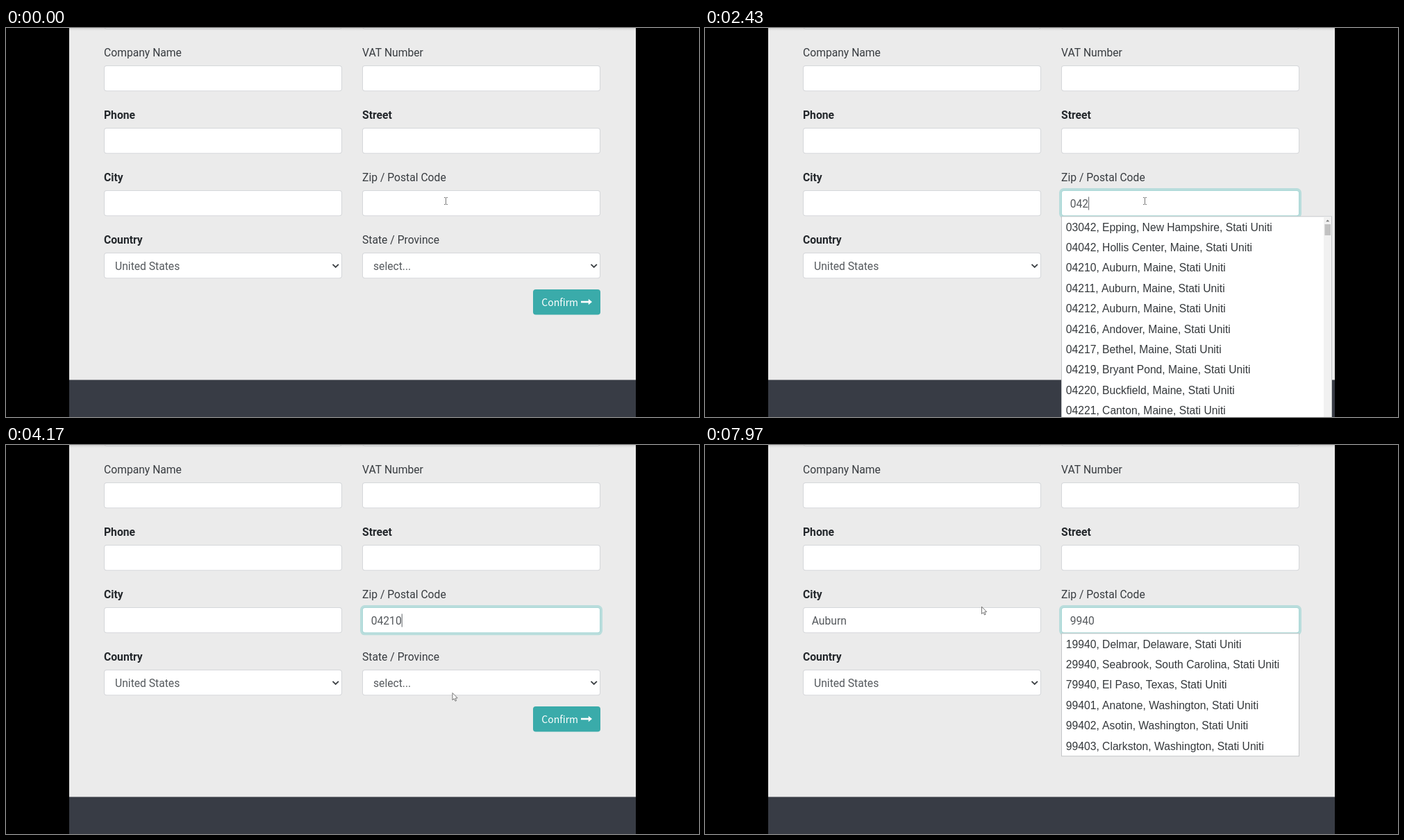
An HTML page with a canvas for the animation above (8 s loop, 998x561 px).

```html
<!DOCTYPE html>
<html lang="en">
<head>
<meta charset="utf-8">
<title>Address form</title>
<style>
html, body { margin: 0; width: 100%; height: 100%; overflow: hidden; background: #000; }
canvas { display: block; width: 998px; height: 561px; }
</style>
</head>
<body>
<canvas id="stage" width="998" height="561"></canvas>
<script>
const ctx = document.getElementById('stage').getContext('2d');
const LOOP = 8000;
const SIZE = 15.68;
const ROBOTO = SIZE + 'px Roboto, sans-serif';
const ARIAL = SIZE + 'px "Liberation Sans", Arial, sans-serif';
const LEFT = 141, RIGHT = 513, FIELD_W = 343, FIELD_H = 37.3;
const ROW_TOP = 272.2, ROW_H = 29.4;
const FOCUS_AT = 650, PICK_AT = 4050, FILL_AT = 4480, DRAG_AT = 5250;

const maine = [
  '03042, Epping, New Hampshire', '04042, Hollis Center, Maine', '04210, Auburn, Maine',
  '04211, Auburn, Maine', '04212, Auburn, Maine', '04216, Andover, Maine',
  '04217, Bethel, Maine', '04219, Bryant Pond, Maine', '04220, Buckfield, Maine',
  '04221, Canton, Maine'
];
const mixed = [
  '19940, Delmar, Delaware', '19941, Ellendale, Delaware', '19943, Felton, Delaware',
  '19944, Fenwick Island, Delaware', '19945, Frankford, Delaware', '19946, Frederica, Delaware',
  '19947, Georgetown, Delaware', '29940, Seabrook, South Carolina',
  '29941, Sheldon, South Carolina', '29943, Tillman, South Carolina'
];
const west = [
  '19940, Delmar, Delaware', '29940, Seabrook, South Carolina', '79940, El Paso, Texas',
  '99401, Anatone, Washington', '99402, Asotin, Washington', '99403, Clarkston, Washington'
];

// [start, end, rows, right edge, scrollable]
const menus = [
  [2300, PICK_AT, maine, 903, true],
  [7200, 7700, mixed, 862, true],
  [7700, LOOP, west, 856, false]
];

const typed = [
  [0, ''], [1500, '0'], [1750, '04'], [2000, '042'], [PICK_AT, '04210'],
  [6250, '9'], [6500, '99'], [6730, '994'], [7070, '9940']
];

// time, x, y of the pointer's hot spot
const path = [
  [0, 633.5, 249.5], [2750, 633.5, 249.5], [3250, 642.5, 361.5], [3780, 642.5, 361.5],
  [3920, 643, 357.5], [4250, 643, 357.5], [4750, 606, 252], [5250, 606, 252],
  [5420, 500, 230], [5680, 393.5, 233.2], [7969, 393.5, 233.2], [7970, 398.5, 233.2],
  [LOOP, 398.5, 233.2]
];

function pointerAt(t) {
  let i = 0;
  while (i < path.length - 2 && t >= path[i + 1][0]) i++;
  const [t0, x0, y0] = path[i], [t1, x1, y1] = path[i + 1];
  const u = (t - t0) / (t1 - t0), e = u * u * (3 - 2 * u);
  return { x: x0 + (x1 - x0) * e, y: y0 + (y1 - y0) * e };
}

function rect(x, y, w, h, color) {
  ctx.fillStyle = color;
  ctx.fillRect(x, y, w, h);
}

function rounded(x, y, w, h, r, color) {
  ctx.fillStyle = color;
  ctx.beginPath();
  ctx.roundRect(x, y, w, h, r);
  ctx.fill();
}

function text(str, x, y, color, font) {
  ctx.font = font;
  ctx.fillStyle = color;
  ctx.fillText(str, x, y);
}

function shape(points, fill, stroke, width) {
  ctx.beginPath();
  points.forEach(([x, y], i) => i ? ctx.lineTo(x, y) : ctx.moveTo(x, y));
  if (fill) {
    ctx.closePath();
    ctx.fillStyle = fill;
    ctx.fill();
  }
  if (stroke) {
    ctx.strokeStyle = stroke;
    ctx.lineWidth = width;
    ctx.stroke();
  }
}

function field(x, y, border = '#d5d7da') {
  rounded(x, y, FIELD_W, FIELD_H, 4, border);
  rounded(x + 1, y + 1, FIELD_W - 2, FIELD_H - 2, 3, '#fff');
}

function label(str, x, y, bold) {
  text(str, x, y, bold ? '#24282c' : '#383c40', (bold ? 'bold ' : '') + ROBOTO);
}

function select(str, x) {
  field(x, 324);
  text(str, x + 16, 348.5, '#55595d', ROBOTO);
  shape([[x + 329.5, 340.8], [x + 333.7, 345], [x + 337.9, 340.8]], null, '#3c4044', 1.8);
}

function confirmButton() {
  rounded(759, 377, 97, 36.5, 4, '#3aabaa');
  text('Confirm', 771.3, 400.7, '#fff', '500 14px "Noto Sans CJK JP", "Noto Sans CJK", "Open Sans", sans-serif');
  rect(828, 393.7, 12, 2.6, '#fff');
  shape([[838.8, 390.8], [844, 395], [838.8, 399.2]], '#fff');
}

function page(t) {
  rect(0, 0, 998, 561, '#000');
  rect(91, 0, 816, 561, '#ebebeb');
  rect(91, 507.5, 816, 54, '#383c45');
  for (const x of [LEFT, RIGHT]) {
    for (const y of [-35.6, 54, 144, 234]) field(x, y);
  }
  const shade = ctx.createLinearGradient(0, 0, 0, 4);
  shade.addColorStop(0, 'rgba(0,0,0,.1)');
  shade.addColorStop(1, 'rgba(0,0,0,0)');
  rect(91, 0, 816, 4, shade);

  label('Company Name', LEFT, 41.4);
  label('VAT Number', RIGHT, 41.4);
  label('Phone', LEFT, 131.4, true);
  label('Street', RIGHT, 131.4, true);
  label('City', LEFT, 221.4, true);
  label('Zip / Postal Code', RIGHT, 221.4);
  label('Country', LEFT, 311.4, true);
  label('State / Province', RIGHT, 311.4);
  const filled = t >= FILL_AT;
  if (filled) text('Auburn', LEFT + 12.7, 258.5, '#55595d', ROBOTO);
  select('United States', LEFT);
  select(filled ? 'Maine' : 'select...', RIGHT);
  confirmButton();
}

function zipField(t, pointer) {
  if (t < FOCUS_AT) return;
  ctx.globalAlpha = Math.min(1, (t - FOCUS_AT) / 150);
  rounded(RIGHT - 3, 231, FIELD_W + 6, FIELD_H + 6, 6.5, '#b9dddc');
  field(RIGHT, 234, '#a9d8d7');
  ctx.globalAlpha = 1;

  const [since, value] = typed.filter(k => k[0] <= t).pop();
  const start = RIGHT + 12.7;
  ctx.font = ROBOTO;
  const width = s => ctx.measureText(s).width;
  const end = start + width(value);
  let picked = false;
  if (t >= DRAG_AT && value === '04210') {
    let n = value.length;
    while (n > 0 && pointer.x < start + width(value.slice(0, n)) - 4.4) n--;
    const from = start + width(value.slice(0, n));
    picked = n < value.length;
    if (picked) rect(from, 243, end - from, 20, '#d0dae9');
  }
  text(value, start, 258.5, '#55595d', ROBOTO);
  const blink = Math.max(since, FOCUS_AT, t >= DRAG_AT && since < DRAG_AT ? DRAG_AT : 0);
  if (!picked && (t - blink) % 1000 < 500) rect(end, 243.5, 1, 19, '#606468');
}

function underline(str, x, y) {
  const parts = str.split(',');
  let before = '';
  parts.forEach((part, i) => {
    const a = x + ctx.measureText(before).width + (i ? 1 : 0);
    before += part;
    const b = x + ctx.measureText(before).width;
    rect(a, y, b - a, 1, '#fff');
    before += ',';
  });
}

function menu([, , rows, right, scrolls], pointer) {
  const bottom = scrolls ? 570 : ROW_TOP + rows.length * ROW_H + 0.6;
  const inner = scrolls ? right - 12 : right - 1;
  rect(513, 271.4, right - 513, bottom - 271.4, '#c4c6c8');
  rect(514, 272.3, right - 515, bottom - 273.3, '#fff');
  const inside = pointer.x > 514 && pointer.x < inner && pointer.y > ROW_TOP;
  const hover = inside ? Math.floor((pointer.y - ROW_TOP) / ROW_H) : -1;
  rows.forEach((row, i) => {
    const y = ROW_TOP + i * ROW_H, on = i === hover, str = row + ', Stati Uniti';
    if (on) rect(514, y, inner - 514, ROW_H, '#007bff');
    text(str, 519.8, y + 20.3, on ? '#fff' : '#34383b', ARIAL);
    if (on) underline(str, 519.8, y + 21.8);
  });
  if (scrolls) {
    rect(inner, 272.3, 11, 298, '#f1f1f1');
    rect(inner + 1.5, 283, 8.5, 16, '#c1c1c1');
    shape([[inner + 3.2, 279.2], [inner + 5.7, 276.4], [inner + 8.2, 279.2]], '#777');
  }
}

function beam() {
  shape([[-2.5, -5], [-0.8, -5], [0, -4.3], [0.8, -5], [2.5, -5]], null, '#777', 1);
  shape([[-2.5, 5], [-0.8, 5], [0, 4.3], [0.8, 5], [2.5, 5]], null, '#777', 1);
  shape([[0, -4.5], [0, 4.5]], null, '#777', 1);
}

function arrow() {
  shape([[0, 0], [0, 10.4], [2.4, 8.2], [4, 11.8], [5.6, 11.1], [4.1, 7.6], [7.2, 7.4]],
    '#fff', '#666', 0.9);
}

function hand() {
  shape([[-1, 0.2], [0.6, 0.2], [1, 4.4], [2.7, 4.5], [4.3, 5], [5.6, 5.9], [5.8, 9.5],
    [4.6, 13.6], [-0.6, 13.6], [-2, 10.8], [-4, 8], [-3.2, 6.9], [-1.2, 8.4]],
    '#fff', '#444', 0.9);
  for (const x of [1.2, 2.7, 4.2]) shape([[x, 8.8], [x, 11.6]], null, '#666', 0.6);
}

function cursor(p, open) {
  const overZip = p.x > 513 && p.x < 856 && p.y > 225 && p.y < 271.5;
  ctx.save();
  ctx.translate(p.x, p.y);
  ctx.lineJoin = 'round';
  if (overZip) beam();
  else if (open && p.x > 514) hand();
  else arrow();
  ctx.restore();
}

function draw(t) {
  const pointer = pointerAt(t);
  const open = menus.find(m => t >= m[0] && t < m[1]);
  page(t);
  zipField(t, pointer);
  if (open) menu(open, pointer);
  cursor(pointer, open);
}

const begin = performance.now();
function tick() {
  draw((performance.now() - begin) % LOOP);
  requestAnimationFrame(tick);
}
tick();
</script>
</body>
</html>
```
